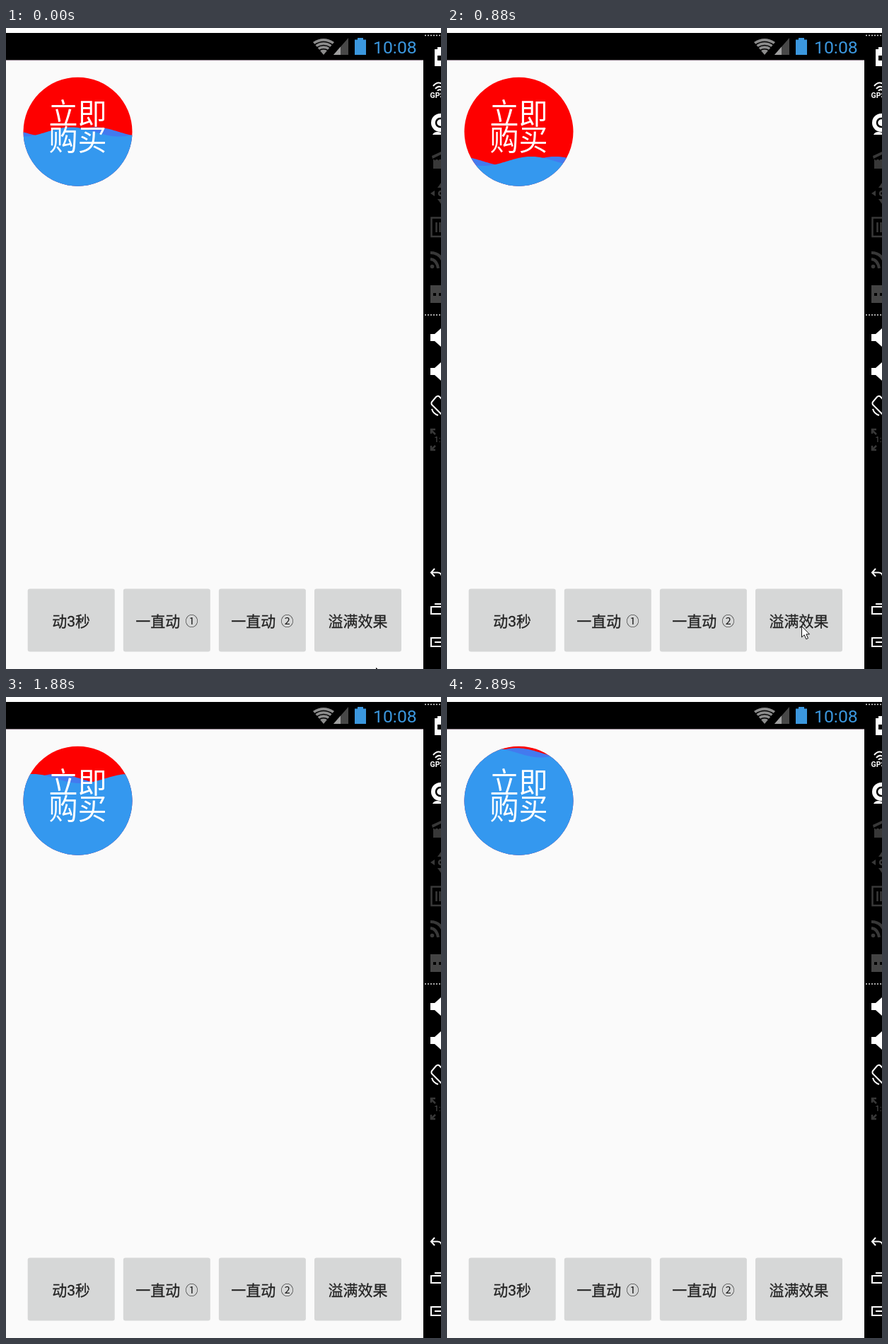
Recreate the animation shown at these times as an HTML page. Size 615 by 907 pixels, loop 2970 ms.

```html
<!DOCTYPE html>
<html lang="zh-CN">
<head>
<meta charset="utf-8">
<style>
  html, body { margin: 0; width: 100%; height: 100%; overflow: hidden; background: #fff; }
  svg { display: block; width: 615px; height: 907px; }
  text { font-family: Roboto, "Noto Sans CJK SC", "Noto Sans CJK", sans-serif; }
  .keys rect { fill: #d6d7d7; }
  .keys text { font-size: 21px; fill: #222; stroke: #222; stroke-width: .3px; text-anchor: middle; }
  .keys tspan { font-size: 18px; stroke: none; }
  .label { font: 41px "Noto Sans CJK SC", "Noto Sans CJK", sans-serif; fill: #fff; }
  .line { fill: none; stroke: #fff; stroke-width: 2; }
  .dim { fill: #383838; }
  .dimline { fill: none; stroke: #383838; stroke-width: 2.5; }
  .thick { stroke-width: 4; }
</style>
</head>
<body>
<svg viewBox="0 0 615 907">
  <defs>
    <clipPath id="disc"><circle cx="101.5" cy="146.7" r="77"/></clipPath>
    <path id="speaker" d="M600 -5h6l9 -8v26l-9 -8h-6z" fill="#fff"/>
  </defs>

  <rect y="45" width="590" height="862" fill="#fafafa"/>
  <rect y="7" width="590" height="38" fill="#000"/>
  <rect y="45" width="590" height="1" fill="#8f858c"/>
  <rect y="46" width="590" height="1" fill="#f3e9f1"/>

  <!-- status icons -->
  <path d="M449 38L434 20Q449 10 464 20Z" fill="#8c8c8c"/>
  <g fill="none" stroke="#000" stroke-width="1.6">
    <path d="M436 24Q449 15 462 24"/>
    <path d="M439 28Q449 21 459 28"/>
    <path d="M442.5 32Q449 27.5 455.5 32"/>
  </g>
  <path d="M463 38L484 14V38Z" fill="#484848"/>
  <path d="M463 38L473 26.5V38Z" fill="#a0a0a0"/>
  <path d="M493 16.5h4v-2.5h8v2.5h4V38h-16z" fill="#3b97de"/>
  <text x="519" y="36" font-size="24.8" fill="#3b97de">10:08</text>

  <!-- side toolbar -->
  <rect x="590" y="7" width="25" height="900" fill="#000"/>
  <path d="M592 10.5H615M592 406H615" stroke="#ddd" stroke-width="1.5" stroke-dasharray="2 2"/>
  <path d="M606 30h4v-3h5v12h-5v7h5v8h-9z" fill="#fff"/>
  <path class="line" d="M604 82Q610 75 616 79M607 86Q611 81 616 84M610 89Q612 86 616 88"/>
  <text x="599.5" y="99" font-size="10.5" font-weight="700" fill="#fff">GPS</text>
  <circle cx="614" cy="134" r="13" fill="#fff"/>
  <circle cx="614" cy="134" r="6" fill="none" stroke="#000" stroke-width="2.5"/>
  <path d="M603 151q3 -6 12 -3v3z" fill="#fff"/>
  <path class="dim" d="M602 181l13 -6v4l-12 6zM604 186h11v13h-11z"/>
  <path d="M606 187l3 -4M611 187l3 -5" stroke="#000" stroke-width="1.5"/>
  <path class="dim" d="M600 234l6 -4v8zM615 219v7h-5zM615 249v-7h-5z"/>
  <circle cx="615" cy="234" r="3" class="dimline"/>
  <path class="dimline" d="M616 268.5H601.5V295H616M608.5 275v14M613.5 275v14"/>
  <path class="dimline thick" d="M600 318Q617 318 620 339M600 327Q609 328 611 340"/>
  <circle cx="602.5" cy="337.5" r="2.8" class="dim"/>
  <rect x="600" y="364" width="15" height="25" fill="#444"/>
  <path d="M604 375h4v4h-4zM612 375h3v4h-3z" fill="#000"/>
  <use href="#speaker" y="438"/>
  <use href="#speaker" y="486"/>
  <path class="line" d="M616 525l-4 -4q-2 -1 -4 1l-6 7q-1 2 0 4l14 14M602 539q2 7 9 9"/>
  <path class="dimline" d="M607 575l-6 -6M601 574v-6h6M607 591l-6 6M601 591v6h6"/>
  <text x="605.5" y="586" font-size="11" fill="#555">1:1</text>
  <path class="line" d="M606 765l-5 5.5 5 5.5M601 770.5h9q5 0 6 5"/>
  <path class="line" d="M616 819h-15v10h15M606 815h10"/>
  <path class="line" d="M616 863h-15v12h15M606 869h10"/>

  <!-- wave button -->
  <g clip-path="url(#disc)">
    <rect x="24" y="69" width="156" height="156" fill="#fe0000"/>
    <path id="back" fill="#437aef"/>
    <path id="front" fill="#3498ef"/>
  </g>
  <text class="label" x="60.5" y="135.5">立即</text>
  <text class="label" x="60.5" y="172.5">购买</text>

  <g class="keys" id="keys"></g>
  <path id="cursor" d="M.5 .5v15.5l3.7 -3.3 2.6 6 2.7 -1.2 -2.6 -5.7h4.6z" fill="#fff" stroke="#111"/>
</svg>

<script>
const LOOP = 2970, BEAT = 77.5;
const PERIOD = 136, AMP = 6.6, LAG = 34;
const RESET = 8, RISE = 34.8;   // beats: when the water drops, how long it refills

const $ = id => document.getElementById(id);

const mark = s => `<tspan dx="2" dy="-1">${s}</tspan>`;
$('keys').innerHTML = ['动3秒', '一直动 ' + mark('①'), '一直动 ' + mark('②'), '溢满效果'].map((s, i) => {
  const x = 30.7 + i * 135.1;
  return `<rect x="${x}" y="793.5" width="123" height="89" rx="3"/>
    <text x="${x + 61.5}" y="846.5">${s}</text>`;
}).join('');
const fillKey = $('keys').querySelector('rect:last-of-type');

// Beats tick evenly, apart from a slow start and one stall near the end.
function beatAt(t) {
  if (t < 210) return t < 70 ? -3 : 0;
  const n = Math.floor((t - 18) / BEAT);
  return t < 2430 ? Math.min(n, 28) : n + 1;
}

// Half full, then emptied and refilled with a decelerating rise.
function levelAt(n) {
  return n < RESET ? 147 : 76.3 + 134.4 * (1 - (n - RESET) / RISE) ** 2;
}

function wave(crest, level) {
  let d = 'M22 230';
  for (let x = 22; x <= 182; x += 2) {
    const y = level - AMP * Math.cos((x - crest) / PERIOD * 2 * Math.PI);
    d += `L${x} ${y.toFixed(2)}`;
  }
  return d + 'V230Z';
}

function draw(t) {
  const n = beatAt(t);
  const level = levelAt(n), crest = 119 - (n - 11) * PERIOD / 5;
  $('front').setAttribute('d', wave(crest, level));
  $('back').setAttribute('d', wave(crest + LAG, level));

  // The pointer comes in, rests on the last key, then leaves.
  const enter = n < 0 ? 1 : n < 2 ? .3 : 0;
  const leave = Math.max(0, n - 17) / 3;
  const x = 501 + 22 * enter + 54 * leave, y = 846 + 59 * enter + 57 * leave;
  $('cursor').setAttribute('transform', `translate(${x} ${y})`);

  const press = Math.abs(n - 5);
  fillKey.style.fill = press < 3 ? '#bbbdbc' : press === 3 ? '#c8cac9' : '';
}

const start = performance.now();
function tick() {
  draw((performance.now() - start) % LOOP);
  requestAnimationFrame(tick);
}
tick();
</script>
</body>
</html>
```
